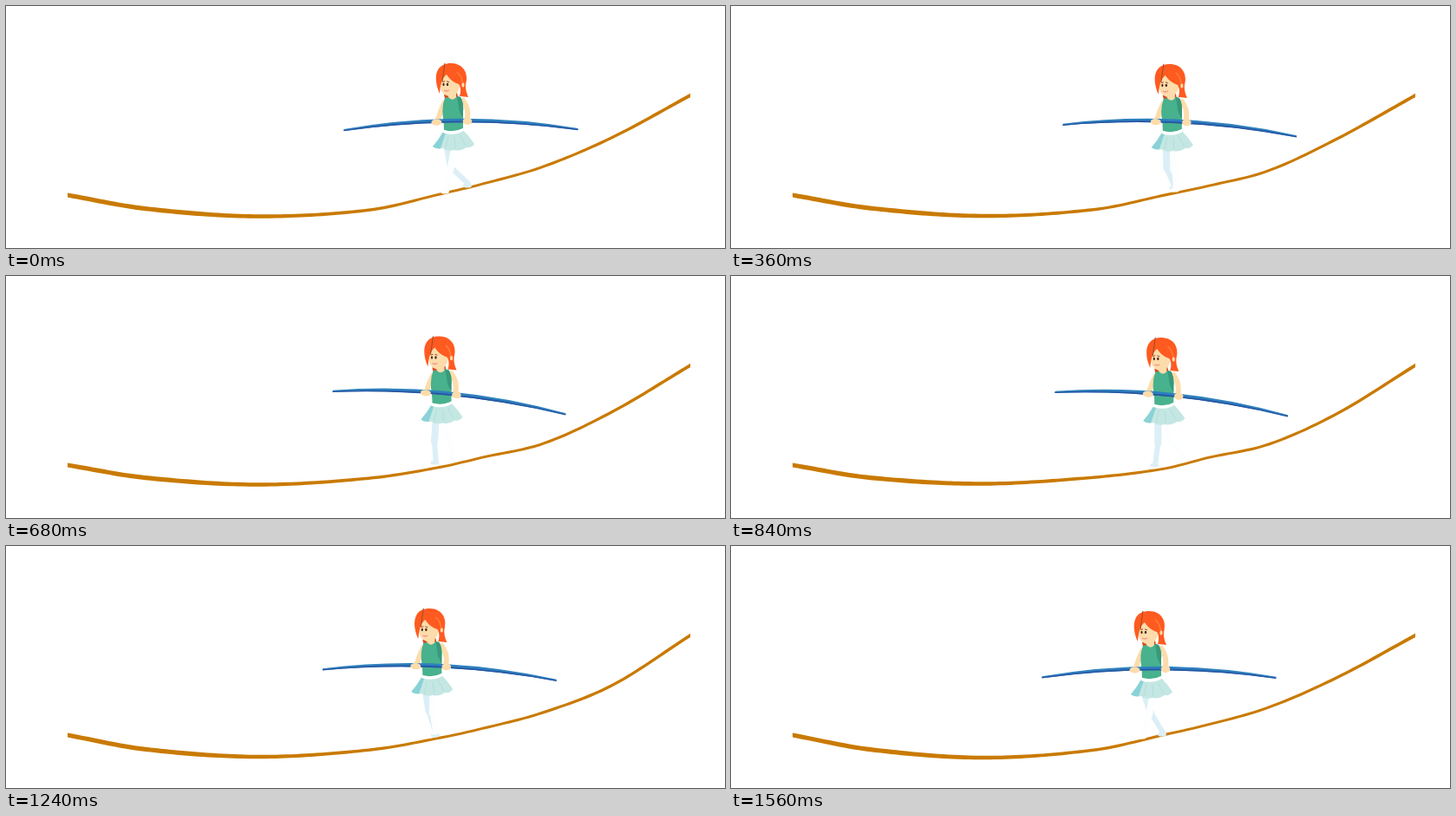
Write an HTML page that moves like this. It is 829x279 px and loops after 1.6 s.

```html
<!DOCTYPE html>
<html lang="en">
<head>
<meta charset="utf-8">
<title>Tightrope walker</title>
<style>
  html, body { margin: 0; width: 100%; height: 100%; overflow: hidden; background: #fff; }
  svg { display: block; }
  .leg { fill: none; stroke-linejoin: round; stroke-linecap: round; }
  .skin { fill: #fddcab; }
</style>
</head>
<body>
<svg width="829" height="279" viewBox="0 0 829 279">
  <path id="rope" fill="#c97a02"/>
  <g id="girl">
    <g id="farLeg" fill="#dceff6" stroke="#dceff6"></g>
    <g id="nearLeg" fill="#fdfeff" stroke="#fdfeff"></g>

    <g fill="none" stroke="#fddcab" stroke-width="6" stroke-linecap="round">
      <path d="M-7 45Q-12 54-15 65"/>
      <path d="M14 43Q21 52 19 64"/>
    </g>
    <path fill="#d9481c" d="M-8 36L-7 41L0 39L8 39L7 34Z"/>
    <path class="skin" d="M-3 34H6V40Q2 45-3 41Z"/>
    <path fill="#48b18d" d="M-7 40L-3 39Q2 45 7 38L11 39Q15 46 14 56V75Q4 80-8 77Q-8 70-9 63Q-11 50-7 40Z"/>
    <path fill="#37997a" d="M7 38L11 39Q15 46 14 56V63Q9 56 9 50Z"/>
    <path fill="#c4e7e3" d="M-9 79Q3 84 14 77Q21 84 27 93Q24 98 18 97Q10 102 4 100Q-5 102-9 98Q-17 100-21 96Q-14 88-9 79Z"/>
    <path fill="#8ad2d7" d="M-9 79L-6 80L-12 98Q-17 99-21 96Q-14 88-9 79Z"/>
    <path fill="none" stroke="#aedbd9" stroke-width=".8" d="M-3 84L-6 98M4 85L5 98M10 83L17 95"/>
    <path fill="none" stroke="#fff" stroke-width="3" d="M-9 78.5Q4 83 14 76.5"/>

    <path class="skin" d="M-13 17C-14 30-9 38-1 38C7 38 11 30 11 19L0 7L-10 12Z"/>
    <path fill="#ff5a20" d="M-13 35C-20 20-20 0 0 0C14 0 20 11 17.500 22C16 29 18 34 20 39L10 38C12 32 11 27 9 24C3 22-2 18-5 13C-10 17-12 23-13 35Z"/>
    <path fill="none" stroke="#ff8138" stroke-width="1.500" d="M7 10Q13 15 13 22"/>
    <ellipse class="skin" cx="14" cy="25" rx="1.600" ry="2.800"/>
    <path fill="none" stroke="#9a4a25" d="M-10 21L-7-.2M-10 21.500L-7 20.800M-5 20.800L-2 21.800" stroke-dasharray="0"/>
    <g fill="#4a2b20">
      <ellipse cx="-8.500" cy="24.500" rx="1.100" ry="1.700"/>
      <ellipse cx="-4" cy="24.500" rx="1.200" ry="1.800"/>
    </g>
    <path fill="none" stroke="#f58d8d" stroke-width="1.300" d="M-8 31Q-5 33-2 31"/>

    <g id="pole">
      <path fill="#2d80bd" d="M-135-1Q0-24.500 135-1V1Q0-17.500-135 1Z"/>
      <path fill="#2756a5" d="M-135 0Q0-20 135 0V1.200Q0-17.500-135 1.200Z"/>
      <ellipse class="skin" cx="-28" cy="-8.500" rx="6" ry="3.600"/>
      <ellipse class="skin" cx="7.500" cy="-9.600" rx="5.300" ry="4"/>
    </g>
  </g>
</svg>
<script>
const LOOP = 1600, STEP = 40;
const keyTimes = [0, 200, 520, 840, 1080, 1400, 1560];
const headTop = [66, 66, 68, 71, 71, 73, 75];

// Each leg pose: knee x, knee y, ankle x, ankle y
const farPoses = [
  [0, 120, 20, 139], [0, 120, 12, 140], [-7, 120, -1, 142], [-4, 122, -7, 145],
  [-2, 119, 3, 145], [0, 117, 12, 143], [2, 117, 16, 140]];
const nearPoses = [
  [-1, 124, -6, 146], [2, 122, 3, 146], [10, 120, 11, 140], [10, 119, 24, 135],
  [7, 122, 12, 143], [0, 119, 1, 139], [0, 120, -7, 143]];

const ropeX = [71, 160, 290, 420, 500, 550, 620, 700, 789];
// Heights of the inner rope points
const ropePoses = [
  [233.5, 242.5, 235, 217, 205, 185, 151],
  [233.5, 242.5, 235, 217, 206.5, 187.5, 151],
  [232.5, 241.5, 234, 219, 208.5, 192, 154],
  [232.5, 239.5, 232, 222, 209.5, 194, 158],
  [234, 242, 235, 223, 212, 194, 162],
  [234.5, 244, 235, 219.5, 208.5, 189.5, 158],
  [234.5, 244, 235, 217.5, 206, 186, 151]];

const byId = id => document.getElementById(id);
const mix = (a, b, k) => Array.isArray(a) ? a.map((v, i) => mix(v, b[i], k)) : a + (b - a) * k;

function sample(values, time, times = keyTimes) {
  let i = 0;
  while (i < times.length - 2 && time >= times[i + 1]) i++;
  return mix(values[i], values[i + 1], (time - times[i]) / (times[i + 1] - times[i]));
}

// Smooth curve through points with uneven spacing
function curveY(xs, ys, x) {
  const last = xs.length - 1;
  let i = 0;
  while (i < last - 1 && x >= xs[i + 1]) i++;
  const slope = j => {
    const a = Math.max(j - 1, 0), b = Math.min(j + 1, last);
    return (ys[b] - ys[a]) / (xs[b] - xs[a]);
  };
  const w = xs[i + 1] - xs[i], u = (x - xs[i]) / w, v = 1 - u;
  return v * v * (1 + 2 * u) * ys[i] + u * u * (3 - 2 * u) * ys[i + 1]
    + w * u * v * (v * slope(i) - u * slope(i + 1));
}

function ropePath(time) {
  const ys = [218, ...sample(ropePoses, time), 103];
  const top = [], bottom = [];
  for (let i = 0; i <= 120; i++) {
    const x = 71 + 718 * i / 120, y = curveY(ropeX, ys, x);
    const half = 1.5 + 1.1 * Math.min(1, (Math.abs(x - 540) / 330) ** 1.5);
    top.push(`${x} ${y - half}`);
    bottom.unshift(`${x} ${y + half}`);
  }
  return `M${[...top, ...bottom].join("L")}Z`;
}

function drawLeg(id, hipX, [kx, ky, ax, ay]) {
  byId(id).innerHTML =
    `<path class="leg" stroke-width="8" d="M${hipX} 99L${kx} ${ky}"/>
     <path class="leg" stroke-width="6" d="M${kx} ${ky}L${ax} ${ay}"/>
     <ellipse stroke="none" cx="${ax - 1}" cy="${ay + 2}" rx="5" ry="2.6"/>`;
}

function draw(now) {
  const time = Math.floor(now % LOOP / STEP) * STEP;
  byId("rope").setAttribute("d", ropePath(time));
  byId("girl").setAttribute("transform", `translate(${513 - 31 * time / 1560} ${sample(headTop, time)})`);
  const tilt = sample([-0.2, 6.4, 0], time, [0, 770, 1570]);
  byId("pole").setAttribute("transform", `translate(11.500 76.500) rotate(${tilt})`);
  drawLeg("farLeg", -4, sample(farPoses, time));
  drawLeg("nearLeg", 4, sample(nearPoses, time));
}

const start = performance.now();
function tick() {
  draw(performance.now() - start);
  requestAnimationFrame(tick);
}
tick();
</script>
</body>
</html>
```
